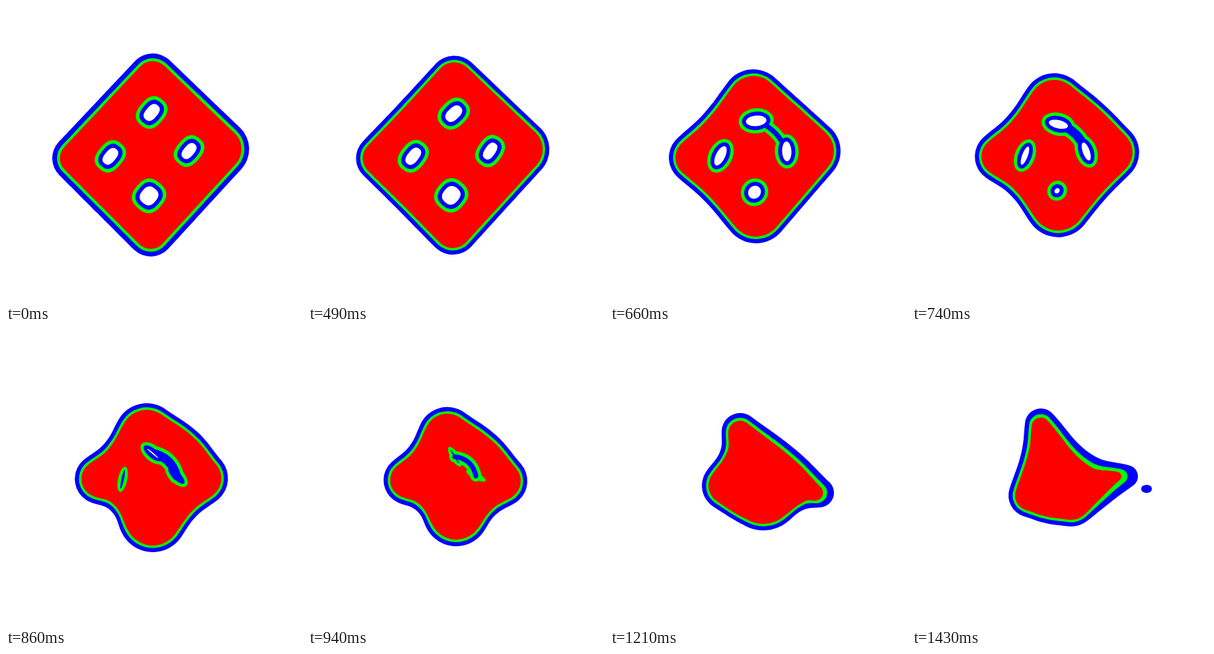
Recreate the animation shown at these times as an HTML page with a canvas. Size 448 by 449 pixels, loop 1.86 s.

```html
<!DOCTYPE html>
<html lang="en">
<head>
<meta charset="utf-8">
<title>Contour map</title>
<style>
  html, body { margin: 0; width: 100%; height: 100%; overflow: hidden; background: #fff; }
  canvas { display: block; }
</style>
</head>
<body>
<canvas id="stage" width="448" height="449"></canvas>
<script>
const ctx = document.getElementById('stage').getContext('2d');
const RED = '#f00', GREEN = '#0f0', BLUE = '#00f', WHITE = '#fff';
const LOOP = 1860, START = 490, FIRST = 463, END = 1430;
const TIMES = [FIRST, 660, 860, 1040, 1210, END];

// Each lobe is a circle that moves through x, y, radius and the dent of the side after it.
const lobes = {
  top: [[222, 109, 37, 0], [217, 144, 48, 0], [213, 160, 49, -7],
        [208, 163, 39, -6], [197, 154, 28, -5], [195, 143, 24, 19]],
  right: [[323, 217, 45, 0], [301, 220, 48, 0], [294, 225, 42, 6],
          [291, 234, 36, 9], [317, 247, 22, 6], [325, 222, 17, 0]],
  bottom: [[219, 344, 36, 0], [221, 310, 50, 4], [222, 285, 52, 15],
           [227, 269, 48, 8], [232, 246, 58, -4], [240, 256, 42, -3]],
  left: [[106, 231, 36, 0], [129, 230, 40, 5], [142, 226, 38, 8],
         [163, 230, 36, 7], [177, 236, 38, 10], [179, 251, 33, 5]]
};

const holes = [
  { from: [220.5, 161.5], to: [222, 187], turn: 90, a: 20, b: 15, stretch: 5, loss: 8 },
  { from: [277, 220], to: [258, 221], turn: -85, a: 19.5, b: 14, stretch: 5, loss: 8 },
  { from: [216.5, 288], to: [221, 277], turn: 0, a: 20, b: 18.5, stretch: -1, loss: 26 },
  { from: [158, 228], to: [176.5, 226.5], turn: -28, a: 20, b: 14.5, stretch: 7, loss: 12.5 }
];

const mix = (a, b, u) => a + (b - a) * u;
const ramp = (time, from, to) => Math.max(0, Math.min(1, (time - from) / (to - from)));

function lobeAt(keys, time) {
  let k = 0;
  while (k < TIMES.length - 2 && time >= TIMES[k + 1]) k++;
  const u = ramp(time, TIMES[k], TIMES[k + 1]);
  const [x, y, r, dent] = keys[k].map((v, i) => mix(v, keys[k + 1][i], u));
  return { x, y, r, dent };
}

// The turning point of the side between two neighbouring lobes.
function waist(p, q) {
  const dx = q.x - p.x, dy = q.y - p.y, length = Math.hypot(dx, dy);
  const u = p.r / (p.r + q.r), out = mix(p.r, q.r, u) - p.dent;
  return { x: p.x + dx * u + dy / length * out, y: p.y + dy * u - dx / length * out };
}

// The angle at which a lobe touches its tangent through a point.
function touch(lobe, point, side) {
  const dx = point.x - lobe.x, dy = point.y - lobe.y;
  return Math.atan2(dy, dx) + side * Math.acos(Math.min(1, lobe.r / Math.hypot(dx, dy)));
}

const onLobe = ({ x, y, r }, angle) => ({ x: x + r * Math.cos(angle), y: y + r * Math.sin(angle) });

function bend(p, q, tangentP, tangentQ) {
  const reach = 0.4 * Math.hypot(q.x - p.x, q.y - p.y);
  ctx.bezierCurveTo(
    p.x + Math.cos(tangentP) * reach, p.y + Math.sin(tangentP) * reach,
    q.x - Math.cos(tangentQ) * reach, q.y - Math.sin(tangentQ) * reach, q.x, q.y);
}

function fillOutline(ring, color) {
  const waists = ring.map((lobe, i) => waist(lobe, ring[(i + 1) % 4]));
  const arcs = ring.map((lobe, i) => ({
    start: touch(lobe, waists[(i + 3) % 4], 1),
    end: touch(lobe, waists[i], -1)
  }));
  ctx.fillStyle = color;
  ctx.beginPath();
  ring.forEach((lobe, i) => {
    const next = (i + 1) % 4, { start, end } = arcs[i];
    ctx.arc(lobe.x, lobe.y, lobe.r, start, end);
    const a = onLobe(lobe, end), b = onLobe(ring[next], arcs[next].start);
    const along = Math.atan2(b.y - a.y, b.x - a.x);
    bend(a, waists[i], end + Math.PI / 2, along);
    bend(waists[i], b, along, arcs[next].start + Math.PI / 2);
  });
  ctx.fill();
}

// Shrinks every lobe; pull draws the inner bands away from the right tip and the top.
function inset([top, right, bottom, left], width, pull) {
  const shrink = (lobe, dx, dy) => ({ ...lobe, x: lobe.x + dx, y: lobe.y + dy, r: lobe.r - width });
  const shift = pull * width;
  return [shrink(top, 0, shift / 4), shrink(right, -shift, 0), shrink(bottom, 0, 0), shrink(left, 0, 0)];
}

function fillBlob({ x, y, tilt, a, b }, grow, power, color) {
  if (a + grow <= 0 || b + grow <= 0) return;
  const c = Math.cos(tilt), s = Math.sin(tilt);
  const round = v => Math.sign(v) * Math.abs(v) ** (2 / power);
  ctx.fillStyle = color;
  ctx.beginPath();
  for (let i = 0; i < 64; i++) {
    const px = (a + grow) * round(Math.cos(i * Math.PI / 32));
    const py = (b + grow) * round(Math.sin(i * Math.PI / 32));
    ctx.lineTo(x + px * c - py * s, y + px * s + py * c);
  }
  ctx.fill();
}

function strokeBridge(p, q, width, color) {
  if (width <= 0) return;
  ctx.strokeStyle = color;
  ctx.lineWidth = width;
  ctx.lineCap = 'round';
  ctx.beginPath();
  ctx.moveTo(p.x, p.y);
  ctx.quadraticCurveTo((p.x + q.x) / 2 + 10, (p.y + q.y) / 2 - 11, q.x, q.y);
  ctx.stroke();
}

function drawHoles(time) {
  const u = (time - FIRST) / (860 - FIRST), power = Math.max(2, 2.6 - 1.2 * u);
  const blobs = holes.map(({ from, to, turn, a, b, stretch, loss }) => ({
    x: mix(from[0], to[0], u),
    y: mix(from[1], to[1], u),
    tilt: (turn * u - 50) * Math.PI / 180,
    a: a + stretch * u - loss * u ** 3,
    b: b - loss * u ** 3
  }));
  const bridge = 15 - ((time - 800) / 51) ** 2;
  for (const [grow, color] of [[5, GREEN], [0, BLUE], [-6, WHITE]]) {
    for (const blob of blobs) fillBlob(blob, grow, power, color);
    if (color !== WHITE) strokeBridge(blobs[0], blobs[1], bridge + 2 * grow, color);
  }
}

function draw(clock) {
  const time = clock < START ? FIRST : Math.min(clock, END);
  const edge = clock < START ? 1.15 : 1;
  const pull = 1.5 * ramp(time, 1040, END);
  const ring = Object.values(lobes).map(keys => lobeAt(keys, time));
  ctx.fillStyle = WHITE;
  ctx.fillRect(0, 0, 448, 449);
  fillOutline(ring, BLUE);
  fillOutline(inset(ring, 6.3 * edge, pull), GREEN);
  fillOutline(inset(ring, 10 * edge, pull), RED);
  drawHoles(time);

  const drop = ramp(time, 1350, END);
  fillBlob({ x: 355, y: 241, tilt: 0, a: 8 * drop, b: 6 * drop }, 0, 2.2, BLUE);
}

function tick() {
  draw(performance.now() % LOOP);
  requestAnimationFrame(tick);
}
tick();
</script>
</body>
</html>
```
